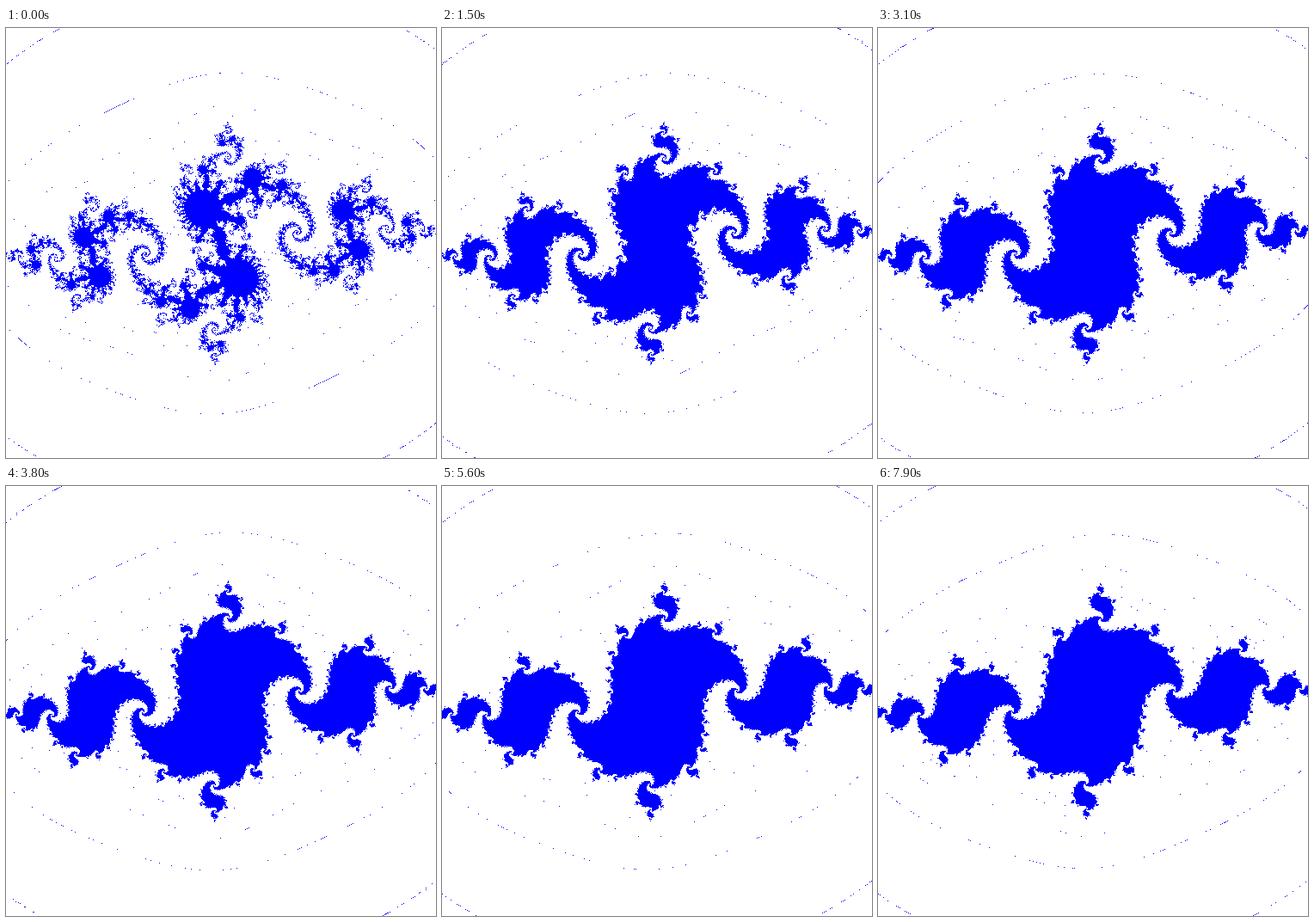
A matplotlib script that plays this animation: 500 px wide and 500 px high, repeating every 8 s.

```python
import numpy as np
import matplotlib.pyplot as plt
from matplotlib.animation import FuncAnimation

SIZE = 500
FRAMES = 80
STEPS = 100
WHITE, BLUE = (255, 255, 255), (0, 0, 255)
PALETTE = np.array([WHITE, BLUE], np.uint8)

# Half of the plane is enough: the set is symmetric under z -> -z.
axis = 3 * np.arange(SIZE + 1) / SIZE - 1.5
half = SIZE // 2 + 1
X0, Y0 = (a.ravel() for a in np.meshgrid(axis, axis[:half]))


def julia(cr, ci):
    """Mark points that stay finite, plus the thin rings left by float overflow."""
    mark = np.zeros(X0.size, bool)
    index = np.arange(X0.size)
    x, y = X0, Y0
    for _ in range(STEPS):
        x, y = x * x - y * y + cr, 2 * (x * y) + ci
        fx, fy = np.isfinite(x), np.isfinite(y)
        keep = fx & fy
        if not keep.all():
            mark[index[np.isinf(x) & fy]] = True
            x, y, index = x[keep], y[keep], index[keep]
    mark[index] = True
    top = mark.reshape(half, SIZE + 1)
    full = np.vstack([top, top[-2::-1, ::-1]])
    return full[:SIZE, :SIZE]


def picture(k):
    return PALETTE[julia(-0.8 - 0.001 * k, 0.156).astype(int)]


fig = plt.figure(figsize=(5, 5), dpi=100, facecolor="white")
ax = fig.add_axes([0, 0, 1, 1])
ax.axis("off")
with np.errstate(all="ignore"):
    image = ax.imshow(picture(0), interpolation="nearest", aspect="auto")


def draw(k):
    with np.errstate(all="ignore"):
        image.set_data(picture(k))
    return (image,)


anim = FuncAnimation(fig, draw, frames=FRAMES, interval=100, repeat=True,
                     repeat_delay=0, blit=False)
plt.show()
```
